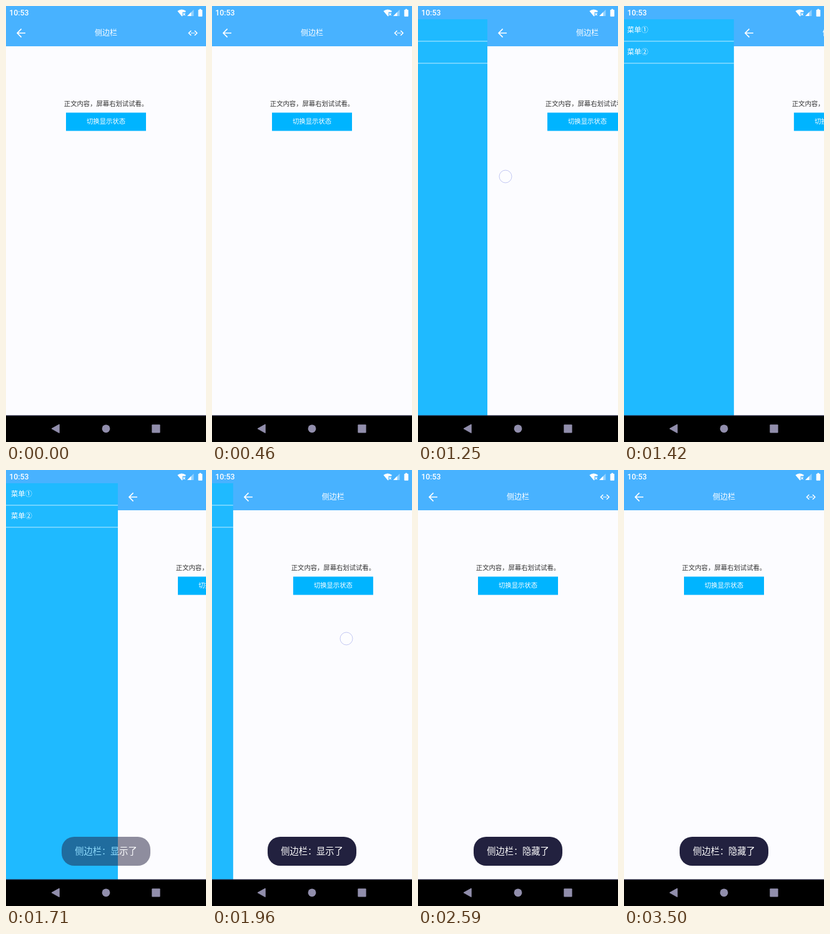
Write an HTML page that moves like this. It is 320 px wide and 693 px high and loops after 3540 ms.

```html
<!DOCTYPE html>
<html lang="zh-CN">
<head>
<meta charset="utf-8">
<title>侧边栏</title>
<style>
  html, body { margin: 0; width: 100%; height: 100%; overflow: hidden; background: #000; }
  svg { display: block; width: 320px; height: 693px; }
  text { font-family: "Noto Sans CJK SC", "Noto Sans CJK", "Noto Sans", sans-serif; fill: #fff; }
  .mid { text-anchor: middle; }
  .clock { font: 500 12.3px Roboto, sans-serif; }
  .line { fill: none; stroke: #fff; stroke-width: 1.6; }
</style>
</head>
<body>
<svg viewBox="0 0 320 693">
  <defs>
    <clipPath id="view"><rect y="21" width="320" height="630"/></clipPath>
  </defs>
  <rect width="320" height="693" fill="#48b2ff"/>

  <g clip-path="url(#view)">
    <g id="menu">
      <rect x="-1" y="21" width="180" height="630" fill="#1fbaff"/>
      <path d="M0 56H179M0 91H179" stroke="#6fd3ff" stroke-width="2"/>
      <text x="8" y="42" font-size="11.3">菜单①</text>
      <text x="8" y="77" font-size="11.3">菜单②</text>
    </g>
    <g id="page">
      <rect y="21" width="320" height="43" fill="#48b2ff"/>
      <rect y="64" width="320" height="587" fill="#fcfcff"/>
      <path class="line" d="M31 43H18.5M24.6 36.4L18 43L24.6 49.6"/>
      <text class="mid" x="160" y="46.6" font-size="12">侧边栏</text>
      <path class="line" stroke-width="1.4" d="M296.2 39.2L292.4 43L296.2 46.8M301.8 39.2L305.6 43L301.8 46.8"/>
      <path d="M296.2 42.3h1.4v1.4h-1.4zM298.3 42.3h1.4v1.4h-1.4zM300.4 42.3h1.4v1.4h-1.4z" fill="#fff"/>
      <text class="mid" x="160" y="158.8" font-size="10.34" style="fill:#333">正文内容，屏幕右划试试看。</text>
      <rect x="96" y="169.5" width="128" height="29" fill="#00b4ff"/>
      <text class="mid" x="160" y="187.4" font-size="10.34">切换显示状态</text>
    </g>
    <circle id="touch" r="10" fill="#fff" fill-opacity=".45" stroke="#c3c8f3"/>
  </g>

  <g id="shown">
    <rect x="89" y="583" width="142" height="46" rx="20" fill="#22213f"/>
    <text class="mid" x="160" y="611.4" font-size="14.22">侧边栏：显示了</text>
  </g>
  <g id="hidden">
    <rect x="89" y="583" width="142" height="46" rx="20" fill="#22213f"/>
    <text class="mid" x="160" y="611.4" font-size="14.22">侧边栏：隐藏了</text>
  </g>

  <text class="clock" x="5.3" y="15.4">10:53</text>
  <g fill="#fff">
    <path d="M274.3 8Q281 3 288 8L286.8 9.8H282.4V16.2H281.2Z"/>
    <path d="M283.4 11.4L286.6 14.8M286.6 11.4L283.4 14.8" stroke="#fff" stroke-width="1.2"/>
    <path d="M300.3 5.8V16H290Z" opacity=".4"/>
    <path d="M296.3 9.8V16H290Z"/>
    <path d="M309.4 4.8h2.8v1.2h1.4q.6 0 .6.6v9.4q0 .8-.8.8h-5q-.8 0-.8-.8v-9.4q0-.6.6-.6h1.2z"/>
  </g>

  <rect y="651" width="320" height="42"/>
  <path d="M0 651H320" stroke="#27264a" stroke-width="1"/>
  <g fill="#918eac">
    <path d="M73 671.8L85.2 665V678.6Z" stroke="#918eac" stroke-linejoin="round"/>
    <circle cx="160" cy="671.8" r="6.4"/>
    <rect x="233.3" y="665.2" width="13.3" height="13.3" rx="1"/>
  </g>
</svg>
<script>
const LOOP = 3540, WIDTH = 179;
const el = id => document.getElementById(id);
const menu = el('menu'), page = el('page'), touch = el('touch');
const shown = el('shown'), hidden = el('hidden');

const ramp = (t, a, b) => Math.min(1, Math.max(0, (t - a) / (b - a)));
const mix = (a, b, k) => a + (b - a) * k;
const easeOut = k => 1 - (1 - k) * (1 - k);

// Linear interpolation through [time, value] points
function track(t, points) {
  let v = points[0][1];
  for (let i = 1; i < points.length; i++) {
    const [a, from] = points[i - 1], [b, to] = points[i];
    if (t >= a) v = mix(from, to, ramp(t, a, b));
  }
  return v;
}

// Each drag is followed by a snap to the nearest end
function sideEdge(t) {
  if (t < 1310) return track(t, [[1130, 0], [1250, 111], [1310, 147]]);
  if (t < 1770) return mix(147, WIDTH, easeOut(ramp(t, 1310, 1470)));
  if (t < 1890) return track(t, [[1770, WIDTH], [1890, 125]]);
  return mix(125, 0, easeOut(ramp(t, 1890, 2036)));
}

function placeTouch(t) {
  const first = t < 1600;
  const x = first
    ? track(t, [[1130, 29], [1250, 140], [1310, 176]])
    : track(t, [[1770, 282], [1890, 228], [1960, 215]]);
  const [down, up] = first ? [1130, 1310] : [1770, 1960];
  touch.setAttribute('cx', x);
  touch.setAttribute('cy', first ? 271 : 268);
  touch.setAttribute('opacity', t < down ? 0 : 1 - ramp(t, up, up + 60));
}

function draw(t) {
  const edge = sideEdge(t);
  page.setAttribute('transform', `translate(${edge})`);
  menu.setAttribute('transform', `translate(${edge - WIDTH})`);
  placeTouch(t);
  shown.setAttribute('opacity', ramp(t, 1660, 1760) * (1 - ramp(t, 2170, 2270)));
  hidden.setAttribute('opacity', ramp(t, 2190, 2290));
}

let start;
function tick(now) {
  start ??= now;
  draw((now - start) % LOOP);
  requestAnimationFrame(tick);
}
draw(0);
requestAnimationFrame(tick);
</script>
</body>
</html>
```
